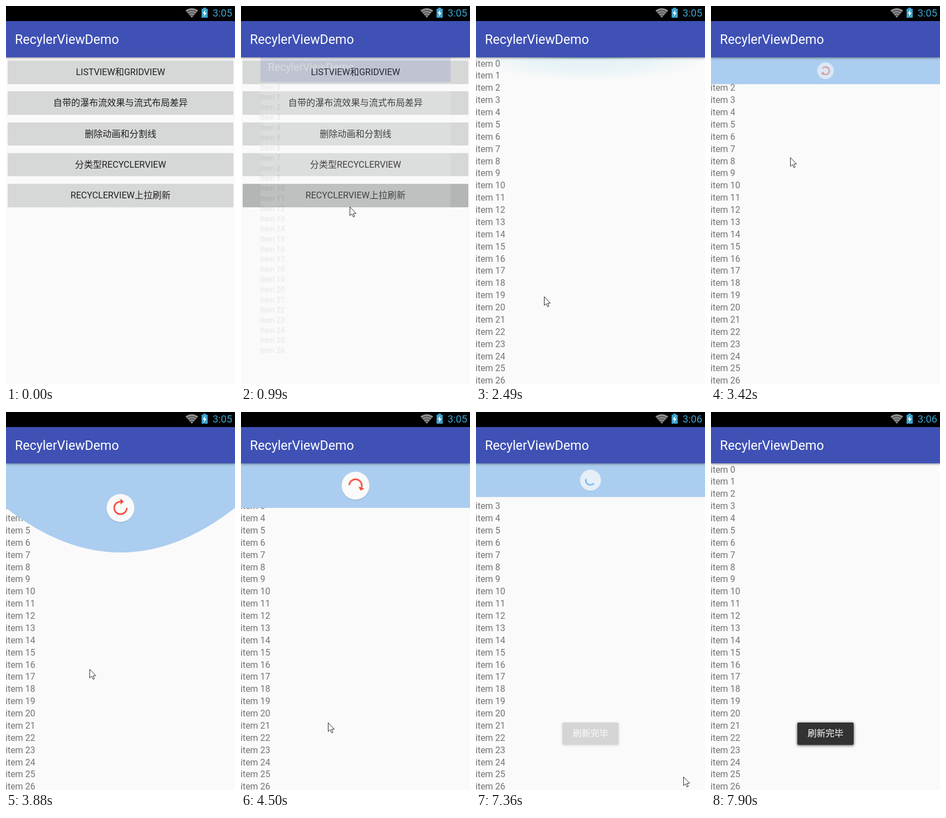
Animation of 411 by 678 pixels, one loop 8.37 s. Source, as an HTML page:

```html
<!DOCTYPE html>
<html lang="zh">
<head>
<meta charset="utf-8">
<title>RecylerViewDemo</title>
<style>
html, body { margin: 0; width: 100%; height: 100%; overflow: hidden; background: #000; }
body { position: relative; font: 16px Roboto, "Noto Sans CJK SC", "Noto Sans CJK", sans-serif; }

/* Every animated part shares the same loop length. */
.anim { animation: 8370ms linear infinite; }
.step { animation-timing-function: step-end; }

.status { position: absolute; left: 0; top: 0; width: 411px; height: 27px; background: #000; }
.status svg { position: absolute; left: 0; top: 0; }
.clock { position: absolute; right: 5px; top: 0; font-size: 18.3px; line-height: 26px; color: #3ba3cd; }
.clock b { font-weight: 400; position: absolute; right: 0; top: 0; }
.before { animation-name: before; }
.after { animation-name: after; }

.page { position: absolute; left: 0; top: 27px; width: 411px; height: 651px; overflow: hidden; background: #fafafa; }
.bar { position: absolute; left: 0; top: 0; width: 395px; height: 64.5px; padding-left: 16px; background: #3f51b5; color: #fff;
  font-size: 23.2px; line-height: 67px; box-shadow: 0 1px 4px rgba(0,0,0,.5); }
.btn { position: absolute; left: 3px; width: 405px; height: 41.5px; border-radius: 2px; background: #d6d7d7; color: #212121;
  font-size: 16.1px; line-height: 42px; text-align: center; box-shadow: 0 0 1px rgba(0,0,0,.25); }
.pressed { animation-name: press; }

.detail { animation-name: open; }
.list { position: absolute; left: -1px; top: 65.5px; color: #757575; animation-name: scroll; }
.list div { height: 21.885px; line-height: 21.885px; white-space: pre; }
.glow { position: absolute; left: 0; width: 411px; height: 44px; opacity: 0; }
.top { top: 64px; animation-name: topGlow;
  background: radial-gradient(ellipse 40% 4px at 50% 0, rgba(70,160,190,.7), transparent),
    radial-gradient(ellipse 52% 100% at 50% 0, rgba(70,185,220,.13), rgba(70,185,220,.09) 55%, transparent); }
.bottom { bottom: 0; animation-name: bottomGlow;
  background: radial-gradient(ellipse 52% 100% at 50% 100%, rgba(70,185,220,.15), transparent); }

.header { position: absolute; left: 0; top: 64.5px; overflow: visible; }
.wave { fill: #abcdef; animation-name: wave; }
.disc { animation-name: disc; }
.spin { animation-name: spin; }
.turn { animation-name: turn; }
.ring { fill: none; stroke-width: 2.6; stroke: currentColor; animation-name: sweep; }
.tint { animation-name: tint; }
.head { fill: currentColor; animation-name: head; }

.toast { position: absolute; left: 155px; top: 557px; width: 101px; height: 40px; border-radius: 2px; background: #323232; color: #fff;
  line-height: 40px; text-align: center; box-shadow: 0 1px 5px rgba(0,0,0,.75); animation-name: toast; }
.cursor { position: absolute; left: 0; top: 0; overflow: visible; animation-name: move; }
.shown { animation-name: shown; }

@keyframes before { 0% { opacity: 1 } 71.2%, 100% { opacity: 0 } }
@keyframes after { 0% { opacity: 0 } 71.2%, 100% { opacity: 1 } }
@keyframes press { 0% { background: #d6d7d7 } 8.8%, 100% { background: #b4b6b6 } }
@keyframes open {
  0%, 11.5% { opacity: 0; transform: scale(.8); animation-timing-function: ease-out }
  15.1%, 100% { opacity: 1; transform: none }
}
@keyframes scroll {
  0%, 17.92% { transform: none }
  19.71%, 25.1% { transform: translateY(-70px) }
  27.48%, 100% { transform: none }
}
@keyframes bottomGlow { 0%, 19.5% { opacity: 0 } 20.5% { opacity: 1 } 22.5%, 100% { opacity: 0 } }
@keyframes topGlow { 0%, 27.5% { opacity: 0 } 28.8%, 30% { opacity: 1 } 35%, 100% { opacity: 0 } }

@keyframes wave {
  0%, 36.44% { d: path("M0 0H411V0Q205.5 0 0 0Z") }
  38.65% { d: path("M0 0H411V14Q205.5 14 0 14Z") }
  40.86% { d: path("M0 0H411V48Q205.5 48 0 48Z") }
  42.5% { d: path("M0 0H411V80Q205.5 80 0 80Z") }
  44.44% { d: path("M0 0H411V80Q205.5 170 0 80Z") }
  46%, 50.54% { d: path("M0 0H411V80Q205.5 240 0 80Z") }
  53.17%, 87.22% { d: path("M0 0H411V80Q205.5 80 0 80Z") }
  90.2%, 100% { d: path("M0 0H411V0Q205.5 0 0 0Z") }
}
@keyframes disc {
  0%, 36.44% { transform: translate(205.5px, 0) scale(0); opacity: 0 }
  38.65% { transform: translate(205.5px, 7px) scale(.175); opacity: .175 }
  40.86% { transform: translate(205.5px, 24px) scale(.6); opacity: .6 }
  42.5% { transform: translate(205.5px, 40px) scale(1); opacity: 1 }
  44.44% { transform: translate(205.5px, 62px) scale(1) }
  46%, 50.54% { transform: translate(205.5px, 80px) scale(1) }
  53.17%, 87.22% { transform: translate(205.5px, 40px) scale(1); opacity: 1 }
  90.2%, 100% { transform: translate(205.5px, 0) scale(0); opacity: 0 }
}
@keyframes spin { 0%, 59.89% { transform: rotate(0deg) } 91.74%, 100% { transform: rotate(468deg) } }
@keyframes turn {
  0%, 36.44% { transform: rotate(0deg) }
  38.65% { transform: rotate(63deg) }
  40.86% { transform: rotate(216deg) }
  42.77% { transform: rotate(387deg) }
  44.44% { transform: rotate(562deg) }
  46%, 51.25% { transform: rotate(720deg) }
  59.89% { transform: rotate(1350deg) }
  67.86% { transform: rotate(1350deg); animation-timing-function: cubic-bezier(.37,0,.63,1) }
  75.82% { transform: rotate(1638deg) }
  83.78% { transform: rotate(1638deg); animation-timing-function: cubic-bezier(.37,0,.63,1) }
  91.74%, 100% { transform: rotate(1926deg) }
}
@keyframes sweep {
  0%, 51.25% { stroke-dasharray: 270 360 }
  59.89%, 75.82% { stroke-dasharray: 15 360; animation-timing-function: cubic-bezier(.37,0,.63,1) }
  67.86%, 83.78% { stroke-dasharray: 303 360; animation-timing-function: cubic-bezier(.37,0,.63,1) }
  91.74%, 100% { stroke-dasharray: 15 360 }
}
@keyframes head {
  0%, 51.25% { transform: rotate(270deg); opacity: 1 }
  59.8% { transform: rotate(15deg); opacity: 1 }
  59.89%, 100% { transform: rotate(15deg); opacity: 0 }
}
@keyframes tint { 0% { color: #f44336 } 59.89% { color: #4caf50 } 75.82%, 100% { color: #2196f3 } }
@keyframes toast { 0%, 87.4% { opacity: 0 } 90.4%, 100% { opacity: 1 } }

@keyframes move {
  0%, 2.1% { transform: translate(324px, 641px) }
  8.2%, 10.04% { transform: translate(195px, 352px) }
  11.8%, 15.8% { transform: translate(195px, 360px) }
  17.68% { transform: translate(190px, 480px) }
  20.9% { transform: translate(185px, 250px) }
  23.9% { transform: translate(150px, 250px) }
  28.8%, 30.3% { transform: translate(122px, 521px) }
  35.5%, 36.44% { transform: translate(132px, 131px) }
  40.86% { transform: translate(142px, 271px) }
  46% { transform: translate(149px, 451px) }
  49.1% { transform: translate(155px, 535px) }
  50.3%, 60.5% { transform: translate(156px, 557px) }
  69.3% { transform: translate(312px, 560px) }
  73.12% { transform: translate(356px, 619px) }
  76%, 90.8% { transform: translate(372px, 654px) }
  93.5%, 100% { transform: translate(376px, 690px) }
}
@keyframes shown { 0% { opacity: 0 } .836%, 100% { opacity: 1 } }
</style>
</head>
<body>
<div class="page" id="menu"><div class="bar">RecylerViewDemo</div></div>

<div class="page detail anim">
  <div class="list anim" id="list"></div>
  <div class="glow top anim"></div>
  <div class="glow bottom anim"></div>
  <svg class="header" width="411" height="170">
    <path class="wave anim" d="M0 0H411V0Q205.5 0 0 0Z"/>
    <g class="disc anim">
      <circle r="26" cy="1" fill="#000" opacity=".06"/>
      <circle r="25" fill="#fafafa"/>
      <g class="tint anim step"><g class="spin anim"><g class="turn anim">
        <circle class="ring anim" r="11.3" pathLength="360"/>
        <path class="head anim" d="M5.8 0H16.8L11.3 5.5Z"/>
      </g></g></g>
    </g>
  </svg>
  <div class="bar">RecylerViewDemo</div>
</div>

<div class="status">
  <svg width="411" height="27">
    <path d="M322 8Q333.5 0 345 8L333.5 21Z" fill="#8e8e8e"/>
    <path d="M324 11.5Q333.5 4.5 343 11.5M327 14.5Q333.5 10 340 14.5M330 17.5Q333.5 15 337 17.5" fill="none" stroke="#222" stroke-width="1"/>
    <path d="M354 3h5v2h3v16h-11v-16h3Z" fill="#3ba3cd"/>
    <path d="M357.5 7L353 13.5H356L355 19L360 12H357Z" fill="#fff"/>
  </svg>
  <div class="clock"><b class="before anim step">3:05</b><b class="after anim step">3:06</b></div>
</div>

<div class="toast anim">刷新完毕</div>
<svg class="cursor anim" width="13" height="20">
  <path class="shown anim step" d="M.5 .5V16L4 12.9L6.6 18.5L9 17.4L6.5 12H11.5Z" fill="#fff" stroke="#111" stroke-width=".9"/>
</svg>

<script>
const add = (parent, text, className = "") => {
  const el = document.createElement("div");
  el.textContent = text;
  el.className = className;
  return parent.appendChild(el);
};

const labels = ["LISTVIEW和GRIDVIEW", "自带的瀑布流效果与流式布局差异", "删除动画和分割线", "分类型RECYCLERVIEW", "RECYCLERVIEW上拉刷新"];
const menu = document.getElementById("menu");
labels.forEach((text, i) => {
  const last = i === labels.length - 1;
  add(menu, text, last ? "btn pressed anim step" : "btn").style.top = 71 + i * 55.3 + "px";
});

const list = document.getElementById("list");
for (let i = 0; i < 30; i++) add(list, "item " + i);
</script>
</body>
</html>
```
